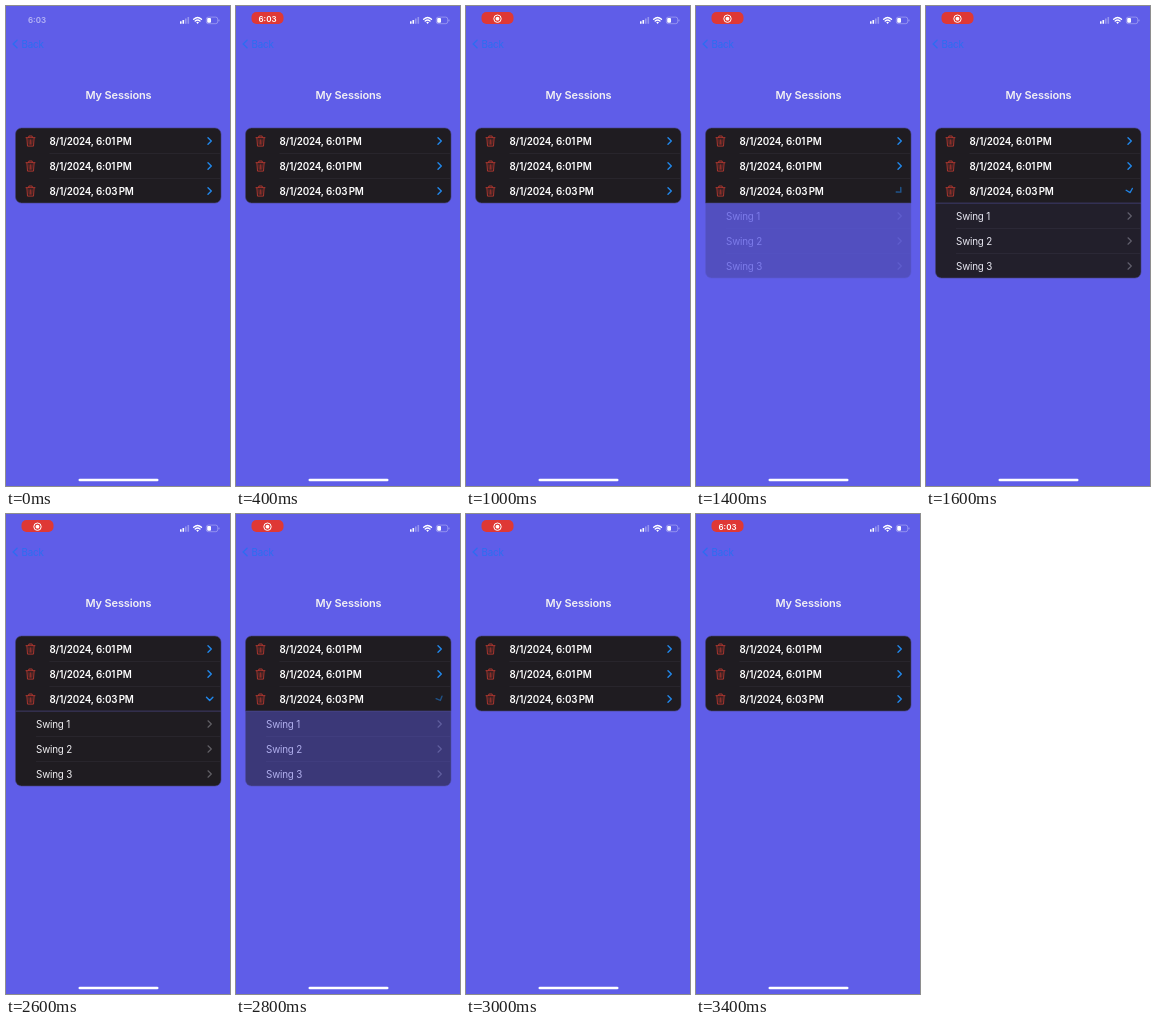
These frames come from a looping animation (224x480 px, 3.5 s). An HTML page:

```html
<!DOCTYPE html>
<html lang="en">
<head>
<meta charset="utf-8">
<title>My Sessions</title>
<style>
  html, body { margin: 0; width: 100%; height: 100%; overflow: hidden; background: #5f5de8; }
  svg { display: block; width: 224px; height: 480px; }
  text { font: 400 9.8px Inter, "Liberation Sans", sans-serif; letter-spacing: -.15px; fill: #f1f0f3; }
  .title { font-size: 11px; font-weight: 600; text-anchor: middle; }
  .date { font-weight: 600; fill: #fff; }
  .clock { font-size: 8px; font-weight: 600; letter-spacing: 0; text-anchor: middle; fill: #fff; }
  .line { fill: none; stroke-linecap: round; stroke-linejoin: round; }
  .card { fill: #1f1c21; stroke: #45427a; stroke-width: .6; }
  .rule { stroke: #302d34; stroke-width: .6; }
</style>
</head>
<body>
<svg viewBox="0 0 224 480">
  <defs>
    <path id="chevron" class="line" d="M-1.7-3.2 1.6 0-1.7 3.2"/>
    <g id="trash" class="line" stroke="#b9382f" stroke-width=".9">
      <path d="M-4.5-3.3H4.5M-1.7-3.5V-5H1.7V-3.5M-3.6-3.1-3 5.1H3L3.6-3.1"/>
      <path d="M-1.5-1.3-1.3 3.3M0-1.3V3.3M1.5-1.3 1.3 3.3" stroke-width=".7"/>
    </g>
  </defs>
  <rect width="224" height="480" fill="#5f5de8"/>

  <text id="plainClock" class="clock" x="31" y="17.3" opacity=".55">6:03</text>
  <g id="pill">
    <rect x="15.5" y="6" width="32" height="12" rx="5" fill="#df3835"/>
    <text id="pillClock" class="clock" x="31.5" y="15.6">6:03</text>
    <g id="record">
      <circle cx="31.5" cy="12.7" r="3.7" fill="none" stroke="#fff"/>
      <circle cx="31.5" cy="12.7" r="1.9" fill="#fff"/>
    </g>
  </g>

  <g fill="#fff">
    <rect x="174" y="15.2" width="1.6" height="2.6" rx=".4"/>
    <rect x="176.5" y="14" width="1.6" height="3.8" rx=".4"/>
    <path d="M179 12.4h1.6v5.4H179zM181.5 11h1.6v6.8h-1.6z" opacity=".35"/>
    <path d="M190.2 16.3Q191.6 15 193 16.3L191.6 17.9Z"/>
    <g class="line" stroke="#fff" stroke-width="1.4">
      <path d="M187.7 13.2Q191.6 9.8 195.5 13.2M189.2 15Q191.6 12.8 194 15"/>
    </g>
    <rect x="200.3" y="11.1" width="11.4" height="6.6" rx="2" fill="none" stroke="#fff" stroke-width=".7" opacity=".45"/>
    <rect x="201.2" y="12" width="3.8" height="4.8" rx="1"/>
    <rect x="212.5" y="13.4" width=".9" height="2" rx=".4" opacity=".45"/>
  </g>

  <g opacity=".85">
    <use href="#chevron" transform="translate(9 38) scale(-1.2)" stroke="#2371f2" stroke-width="1.1"/>
    <text x="15.5" y="41.5" style="fill:#2371f2">Back</text>
  </g>
  <text class="title" x="112.5" y="92.5">My Sessions</text>

  <g id="panel"></g>
  <path id="base" class="card"/>
  <g id="rows"></g>
  <rect x="72.5" y="472.7" width="80" height="2.6" rx="1.3" fill="#fff"/>
</svg>
<script>
const LOOP = 3500;
const $ = id => document.getElementById(id);

// Tables of [time, value]
const tracks = {
  pill: [[100, 0], [400, 1]],
  record: [[650, 0], [850, 1], [3150, 1], [3350, 0]],
  angle: [[1300, 0], [1400, 45], [1500, 62], [1600, 74], [1800, 90],
          [2640, 90], [2800, 67], [2900, 30], [3000, 0]],
  glow: [[1300, 1], [1400, .55], [1500, .7], [1600, .95], [1700, 1],
         [2640, 1], [2800, .5], [2950, 1]]
};

function sample(track, t) {
  if (t <= track[0][0]) return track[0][1];
  for (let i = 1; i < track.length; i++) {
    const [t0, a] = track[i - 1], [t1, b] = track[i];
    if (t <= t1) return a + (b - a) * (t - t0) / (t1 - t0);
  }
  return track[track.length - 1][1];
}

function ease(t, start, length) {
  const u = Math.min(1, Math.max(0, (t - start) / length));
  return u * u * (3 - 2 * u);
}

// Card with separate top and bottom corner radii
function card(y, h, top, bottom) {
  const arc = (r, x, y) => `a${r} ${r} 0 0 1 ${x} ${y}`;
  return `M9.5 ${y + top}${arc(top, top, -top)}H${215 - top}${arc(top, top, top)}` +
    `V${y + h - bottom}${arc(bottom, -bottom, bottom)}H${9.5 + bottom}${arc(bottom, -bottom, -bottom)}Z`;
}

const rule = (x, y) => `<path class="rule" d="M${x} ${y}H214.5"/>`;
const chevron = (y, color, width, id = "") =>
  `<use ${id} href="#chevron" transform="translate(203.7 ${y})" stroke="${color}" stroke-width="${width}"/>`;

$("rows").innerHTML = ["6:01", "6:01", "6:03"].map((time, i) => {
  const y = 135 + i * 25;
  return (i ? rule(43.5, y - 12.5) : "") +
    `<use href="#trash" x="24.5" y="${y}"/>` +
    `<text class="date" x="43.5" y="${y + 3.5}">8/1/2024, ${time}<tspan dx="1.2">PM</tspan></text>` +
    chevron(y, "#2188ec", 1.4, i == 2 ? 'id="toggle"' : "");
}).join("");

$("panel").innerHTML = `<path class="card" d="${card(197, 75, 0, 6)}"/>` +
  [1, 2, 3].map(n => {
    const y = 185 + n * 25;
    return (n > 1 ? rule(30, y - 12.5) : "") +
      `<text x="30" y="${y + 3.5}">Swing ${n}</text>` + chevron(y, "#626066", 1.2);
  }).join("");

function draw(t) {
  const open = ease(t, 1300, 350) - ease(t, 2640, 350);
  const pill = sample(tracks.pill, t);
  const record = sample(tracks.record, t);
  $("pill").setAttribute("opacity", pill);
  $("plainClock").setAttribute("opacity", .55 * (1 - pill));
  $("record").setAttribute("opacity", record);
  $("pillClock").setAttribute("opacity", 1 - record);
  $("panel").setAttribute("opacity", open);
  $("base").setAttribute("d", card(122, 75, 6, 6 * Math.max(0, 1 - open * 6)));
  $("toggle").setAttribute("transform", `translate(203.7 185) rotate(${sample(tracks.angle, t)})`);
  $("toggle").setAttribute("opacity", sample(tracks.glow, t));
}

const start = performance.now();
function tick() {
  draw((performance.now() - start) % LOOP);
  requestAnimationFrame(tick);
}
tick();
</script>
</body>
</html>
```
